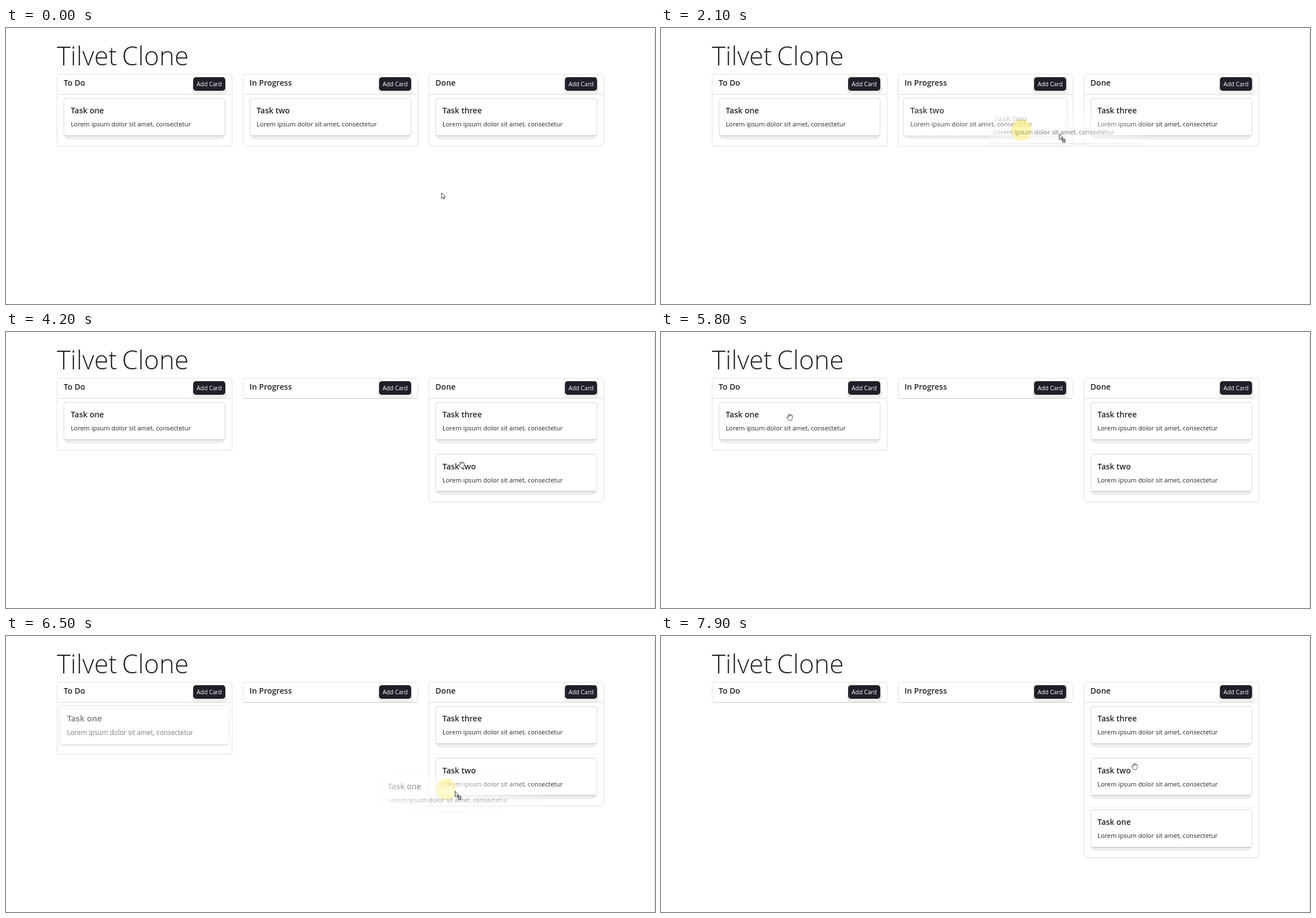
Recreate the animation shown at these times as an HTML page. Size 1148 by 488 pixels, loop 8 s.

```html
<!DOCTYPE html>
<html lang="en">
<head>
<meta charset="utf-8">
<title>Task board</title>
<style>
html, body { margin: 0; width: 100%; height: 100%; overflow: hidden; background: #fff; }
svg { display: block; font-family: "Open Sans", "Noto Sans", sans-serif; fill: #212529; }
.title { font-size: 46px; font-weight: 300; }
.head { font-size: 14px; font-weight: 600; }
.body { font-size: 11.25px; }
.btn { font-size: 10.3px; fill: #fff; }
</style>
</head>
<body>
<svg id="stage" width="1148" height="488" viewBox="0 0 1148 488"></svg>
<script>
const LOOP = 8000, STEP = 100, ROW = 91.5, W = 310;
const stage = document.getElementById('stage');
const heads = ['To Do', 'In Progress', 'Done'];
const names = ['Task one', 'Task two', 'Task three'];
const columnX = i => 90 + i * 328.8;

// Pointer moves: start, end, goal x, goal y; it rests in between
const moves = [
  [0, 300, 800, 432], [300, 700, 909, 147], [900, 1100, 910, 152],
  [1200, 1800, 559, 173], [1900, 2650, 873, 203],
  [3100, 3800, 878, 258], [3800, 4200, 806, 235], [4200, 4600, 818, 241],
  [5400, 5800, 228, 151], [5800, 5900, 233, 154], [5900, 6500, 794, 274],
  [6500, 6900, 850, 276], [7100, 7900, 838, 231]
];
const drags = [{ card: 1, press: 1800, drop: 3100 }, { card: 0, press: 5900, drop: 7200 }];

const clamp = v => Math.min(1, Math.max(0, v));
const easeOut = u => 1 - (1 - u) ** 2;

function pointer(t) {
  let x = 770, y = 291;
  for (const [start, end, gx, gy] of moves) {
    const k = easeOut(clamp((t - start) / (end - start)));
    x += (gx - x) * k;
    y += (gy - y) * k;
  }
  return [x, y];
}

const text = (cls, x, y, s, extra = '') => `<text class="${cls}" x="${x}" y="${y}" ${extra}>${s}</text>`;
const box = (x, y, w, h, r, style) => `<rect x="${x}" y="${y}" width="${w}" height="${h}" rx="${r}" ${style}/>`;
const line = (x, y, w, color) => `<path d="M${x} ${y}h${w}" stroke="${color}"/>`;

function column(x, name, rows) {
  let s = box(x + .5, 81.5, W - .5, 36 + rows * ROW, 3.5, 'fill="#fff" stroke="#dfdfdf"');
  s += line(x + 2, 117.5, W - 4, rows ? '#d8d8d8' : '#c4c4c4');
  for (let i = 1; i < rows; i++) s += line(x + 1, 117.5 + i * ROW, W - 1, '#e4f4f0');
  s += text('head', x + 12, 102, name);
  s += box(x + 238.5, 98, 63, 19, 7, 'fill="#eee"');
  s += box(x + 241, 87, 57, 24, 5, 'fill="#1f2028"');
  return s + text('btn', x + 269.5, 103.3, 'Add Card', 'text-anchor="middle"');
}

function card(x, y, name, shadow = 6) {
  return box(x + .5, y + 10, 285, 57 + shadow, 9, 'fill="#ededed"')
    + box(x + .5, y + .5, 285, 66, 3.5, 'fill="#fff" stroke="#d6d6d6"')
    + line(x + 3, y + 66.5, 280, shadow < 6 ? '#d6d6d6' : '#bfbfbf')
    + text('head', x + 12.5, y + 27, name)
    + text('body', x + 12.5, y + 50, 'Lorem ipsum dolor sit amet, consectetur');
}

function raised(x, y, name, k) {
  const cx = x + 143, cy = y + 33.5;
  return `<g opacity="${1 - .4 * k}" transform="translate(${cx} ${cy}) scale(${1 + .05 * k}) translate(${-cx} ${-cy})">
    ${card(x, y, name, 6 - 3 * k)}</g>`;
}

function ghost(x, y, px, py, name) {
  return `<defs><radialGradient id="fade" gradientUnits="userSpaceOnUse" cx="0" cy="0" r="1"
      gradientTransform="translate(${px} ${py}) scale(190 45)">
      <stop stop-color="#fff" stop-opacity=".75"/><stop offset="1" stop-color="#fff" stop-opacity="0"/>
    </radialGradient>
    <mask id="soft" maskUnits="userSpaceOnUse" x="0" y="0" width="1148" height="488">
      <rect width="1148" height="488" fill="url(#fade)"/></mask></defs>
    <g mask="url(#soft)">${card(x, y, name)}</g>`;
}

const arrow = '<path d="M.5 .5V10.4L2.8 8.3 4.3 11.7 5.8 11 4.3 7.7H7.3Z" fill="#fff" stroke="#222" stroke-width=".9"/>';
const badge = '<path d="M6.5 9.5h4v6h-4zM7.5 12.5h2M8.5 11v3" fill="#fff" stroke="#333"/>';
// Fingers and palm: a dark outline under a thinner white stroke
const hand = [['#333', 2.7], ['#fff', 1.2]].map(([color, w]) =>
  `<path d="M-2.4-3.3V1M-.5-4.4V1M1.5-4V1M3.4-2.8V1L2.2 4.4H-1L-4.3 .4M-2 1H3L2 4H-1Z" fill="#fff"
    stroke="${color}" stroke-width="${w}" stroke-linecap="round" stroke-linejoin="round"/>`).join('');

function draw(t) {
  const [px, py] = pointer(t);
  const lists = [[0], [1], [2]];
  for (const d of drags) if (t >= d.drop) {
    lists[d.card] = [];
    lists[2].push(d.card);
  }
  const held = drags.find(d => t >= d.press && t < d.drop);
  const dragging = held && t > held.press && t < held.drop - STEP;
  let over = false;
  let s = text('title', 90, 66, 'Tilvet') + text('title', 205, 66, 'Clone');
  s += '<path d="M1147 6V488" stroke="#eee" stroke-width="2"/>';

  lists.forEach((list, i) => s += column(columnX(i), heads[i], list.length));
  lists.forEach((list, i) => list.forEach((id, row) => {
    const x = columnX(i) + 12, y = 124 + row * ROW;
    const k = held && held.card === id ? clamp((t - held.press - 2 * STEP) / 300 + .02) : 0;
    s += k > .02 ? raised(x, y, names[id], k) : card(x, y, names[id]);
    over ||= px > x && px < x + 286 && py > y && py < y + 67;
  }));

  if (held) {
    const [cx, cy] = pointer(t - STEP);
    s += `<circle cx="${cx}" cy="${cy}" r="18.3" fill="#ffe83b" opacity=".7"/>`;
  }
  if (dragging) {
    const [gx, gy] = pointer(held.press);
    s += ghost(columnX(held.card) + 12 + px - gx, 124 + py - gy, px, py, names[held.card]);
  }
  const shape = dragging ? arrow + badge : over ? hand : arrow;
  stage.innerHTML = s + `<g transform="translate(${px} ${py})">${shape}</g>`;
}

let last = -1;
function frame(now) {
  const t = Math.floor(now % LOOP / STEP) * STEP;
  if (t !== last) draw(last = t);
  requestAnimationFrame(frame);
}
draw(0);
requestAnimationFrame(frame);
</script>
</body>
</html>
```
